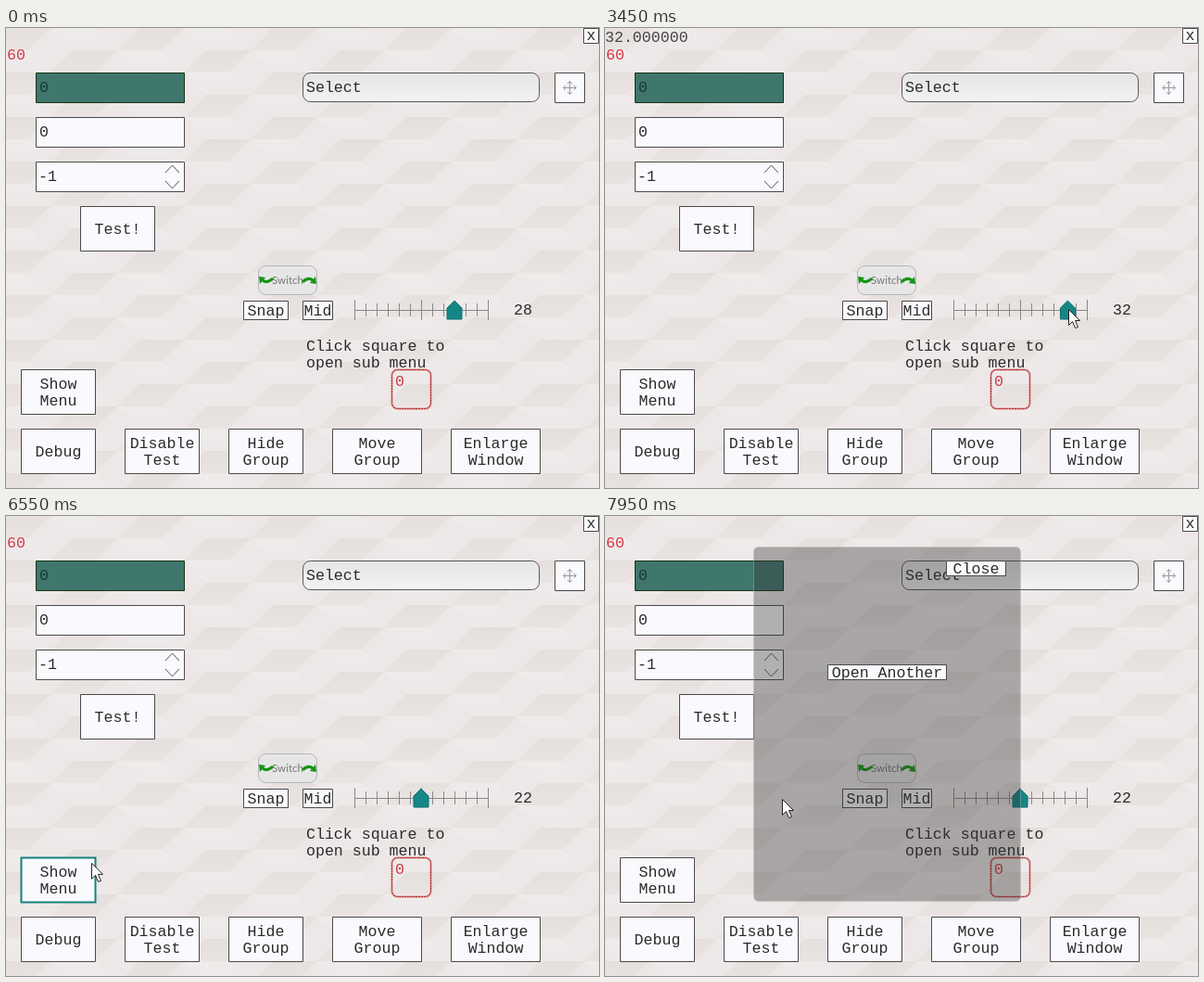
An HTML page with a canvas for the animation above (8000 ms loop, 640x496 px).

```html
<!DOCTYPE html>
<html>
<head>
<meta charset="utf-8">
<style>
html, body { margin: 0; width: 100%; height: 100%; overflow: hidden; background: #ece7e6; }
canvas { display: block; }
</style>
</head>
<body>
<canvas id="stage" width="640" height="496"></canvas>
<script>
const stage = document.getElementById('stage');
const ctx = stage.getContext('2d');
const LOOP = 8000;
const INK = '#2b2b2b', PAPER = '#fafafe', TEAL = '#16817f', RED = '#d33a48';
const MONO = '16.6px "Liberation Mono", "Courier New", monospace';

// Pointer path: time, x, y
const POINTER = [
  [50, 492, 448], [550, 484, 304], [900, 484, 306], [1250, 483, 384], [1650, 484, 304],
  [1750, 482, 304], [2050, 453, 304], [2150, 449, 304], [2600, 390, 304],
  [3405, 504, 303], [3450, 500, 303], [4195, 406, 304], [4300, 385, 304],
  [4420, 382, 304], [4780, 448, 304], [4850, 448, 304], [5150, 279, 303],
  [5500, 277, 303], [6050, 277, 303], [6650, 55, 388], [7600, 55, 388],
  [7700, 68, 384], [7950, 191, 305], [8000, 191, 305]
];
const GRAB = 600, RELEASE = 4850, MENU_START = 6890;

const clamp = v => Math.max(0, Math.min(1, v));

function pointerAt(t) {
  if (t <= POINTER[0][0]) return POINTER[0].slice(1);
  const i = POINTER.findIndex(k => k[0] >= t);
  const [t0, x0, y0] = POINTER[i - 1], [t1, x1, y1] = POINTER[i];
  const p = (t - t0) / (t1 - t0);
  return [x0 + (x1 - x0) * p, y0 + (y1 - y0) * p];
}

// The value snaps to even steps and trails the pointer slightly.
function valueAt(t) {
  if (t < GRAB) return 28;
  const x = pointerAt(Math.min(t, RELEASE) - 50)[0];
  return 10 + 2 * Math.max(0, Math.min(12, Math.round((x - 376) / 12)));
}

// Exponential smoothing of the snapped position.
function handleAt(t) {
  let sum = 0, total = 0;
  for (let age = 0; age < 210; age += 3) {
    const weight = Math.exp(-age / 30);
    sum += weight * (376 + (valueAt(t - age) - 10) * 6);
    total += weight;
  }
  return sum / total;
}

function text(str, x, y, color = INK, align = 'left', font = MONO) {
  ctx.font = font;
  ctx.textAlign = align;
  ctx.textBaseline = 'middle';
  ctx.fillStyle = color;
  ctx.fillText(str, x, y + 1);
}

function box(x, y, w, h, fill = PAPER, stroke = '#4a4a4a', radius = 0, line = 1) {
  ctx.beginPath();
  ctx.roundRect(x + .5, y + .5, w - 1, h - 1, radius);
  if (fill) { ctx.fillStyle = fill; ctx.fill(); }
  if (stroke) { ctx.strokeStyle = stroke; ctx.lineWidth = line; ctx.stroke(); }
}

function button(x, y, w, h, label, stroke, line) {
  box(x, y, w, h, PAPER, stroke, 0, line);
  const rows = label.split('\n');
  rows.forEach((row, i) =>
    text(row, x + w / 2, y + h / 2 + (i - (rows.length - 1) / 2) * 18, INK, 'center'));
}

function shape(points, fill, stroke) {
  ctx.beginPath();
  points.forEach(([x, y]) => ctx.lineTo(x, y));
  ctx.closePath();
  if (fill) { ctx.fillStyle = fill; ctx.fill(); }
  if (stroke) { ctx.strokeStyle = stroke; ctx.lineWidth = 1; ctx.stroke(); }
}

function lines(color, segments, width = 1) {
  ctx.strokeStyle = color;
  ctx.lineWidth = width;
  ctx.beginPath();
  for (const [first, ...rest] of segments) {
    ctx.moveTo(...first);
    rest.forEach(p => ctx.lineTo(...p));
  }
  ctx.stroke();
}

function linear(x0, y0, x1, y1, from, to) {
  const g = ctx.createLinearGradient(x0, y0, x1, y1);
  g.addColorStop(0, from);
  g.addColorStop(1, to);
  return g;
}

function background() {
  const s = 48, h = 24;
  ctx.fillStyle = '#ede8e7';
  ctx.fillRect(0, 0, 640, 496);
  for (let col = 0; col < 11; col++) {
    for (let row = -1; row < 12; row++) {
      const x = col * s * 1.5, y = row * h * 2 + (col % 2) * h;
      shape([[x, y], [x + s, y], [x + s / 2, y + h], [x - s / 2, y + h]],
        linear(x, y, x, y + h, '#e5dfde', '#e9e3e2'));
      shape([[x, y], [x + s, y], [x + s / 2, y - h], [x - s / 2, y - h]],
        linear(x, y - h, x, y, '#efebea', '#ede9e8'));
    }
  }
}

function switchArrow(x, flip) {
  ctx.save();
  ctx.translate(x, 272);
  ctx.scale(flip, flip);
  ctx.strokeStyle = '#149414';
  ctx.lineWidth = 3;
  ctx.beginPath();
  ctx.moveTo(7, -2);
  ctx.quadraticCurveTo(1, 4, -4, 0);
  ctx.stroke();
  shape([[-8, -4], [-1, -3], [-7, 4]], '#149414');
  ctx.restore();
}

function fields() {
  box(32, 48, 161, 33, '#40776d', '#15330f');
  text('0', 36, 64, '#183832');
  box(32, 96, 161, 33);
  text('0', 36, 112);
  box(32, 144, 161, 33);
  text('-1', 35, 160);
  lines('#555', [
    [[172, 156], [179.5, 148], [187, 156]],
    [[172, 165], [179.5, 173], [187, 165]]
  ]);

  box(320, 48, 256, 32, linear(0, 48, 0, 80, '#e4e4e4', '#f3f3f3'), '#555', 8);
  text('Select', 324, 64);
  box(592, 48, 33, 33);
  lines('#999', [
    [[602, 64.5], [615, 64.5]], [[608.5, 58], [608.5, 71]],
    [[604, 62], [601.5, 64.5], [604, 67]], [[613, 62], [615.5, 64.5], [613, 67]],
    [[606, 60], [608.5, 57.5], [611, 60]], [[606, 69], [608.5, 71.5], [611, 69]]
  ]);
  box(623, 0, 17, 17);
  text('x', 631.5, 8, INK, 'center');
}

function slider(t) {
  const ticks = [[[376, 304.5], [521, 304.5]]];
  for (let i = 0; i <= 12; i++) {
    const x = 376.5 + i * 12, reach = i % 6 ? 7 : 11;
    ticks.push([[x, 304 - reach], [x, 304 + reach]]);
  }
  lines('#8b8888', ticks);
  const x = handleAt(t);
  shape([[x, 294], [x + 8, 302], [x + 8, 314], [x - 8, 314], [x - 8, 302]], '#158686', '#0d6e70');
  text(valueAt(t), 548, 304);
}

function controls(t, px, py) {
  const hover = (x, y, w, h) => t >= 50 && px >= x && px < x + w && py >= y && py < y + h;
  const plain = '#4a4a4a';

  button(80, 192, 81, 49, 'Test!');
  box(272, 256, 64, 32, '#e6e6e6', '#b4b4b4', 8);
  text('Switch', 304, 271, '#777', 'center', '11.5px Lato, "Open Sans", sans-serif');
  switchArrow(281, 1);
  switchArrow(327, -1);

  const snap = hover(256, 294, 49, 21), mid = t > RELEASE && hover(320, 294, 33, 21);
  button(256, 294, 49, 21, 'Snap', snap ? TEAL : plain, snap ? 2 : 1);
  button(320, 294, 33, 21, 'Mid', mid ? TEAL : plain, mid ? 2 : 1);
  slider(t);

  text('Click square to', 324, 343);
  text('open sub menu', 324, 361);
  box(416, 368, 43, 43, null, '#d98a8a', 6, 2);
  ctx.setLineDash([2, 1]);
  box(416, 368, 43, 43, null, '#b02a2a', 6);
  ctx.setLineDash([]);
  text('0', 420, 381, RED);

  const pressed = t >= MENU_START - 40 && t < 7550;
  const over = t < MENU_START && hover(16, 368, 81, 49);
  button(16, 368, 81, 49, 'Show\nMenu', pressed ? '#a33c3c' : over ? TEAL : plain, pressed || over ? 2 : 1);
  button(16, 432, 81, 49, 'Debug');
  button(128, 432, 81, 49, 'Disable\nTest');
  button(240, 432, 81, 49, 'Hide\nGroup');
  button(352, 432, 97, 49, 'Move\nGroup');
  button(480, 432, 97, 49, 'Enlarge\nWindow');
}

function menu(t) {
  const age = t - MENU_START;
  if (age < 0) return;
  const p = clamp(age / 800) - 1;
  const eased = 1 + 2.70158 * p ** 3 + 1.70158 * p ** 2;
  ctx.save();
  ctx.translate(0, 52 * (1 - eased));
  ctx.globalAlpha = clamp(age / 90);
  box(160, 33, 289, 383, 'rgba(50,50,50,.37)', 'rgba(190,190,190,.4)', 5);
  ctx.globalAlpha = clamp(age / 520);
  button(368, 48, 65, 17, 'Close');
  button(240, 160, 129, 17, 'Open Another');
  ctx.restore();
}

function pointer(x, y) {
  const outline = [[0, 0], [0, 17], [4, 13], [7, 20], [10, 19], [7, 12], [12, 12]];
  shape(outline.map(([dx, dy]) => [x + dx + .5, y + dy + .5]), '#fff', '#222');
}

function draw(t) {
  const [px, py] = pointerAt(t);
  background();
  if (t >= GRAB && t < RELEASE) text(valueAt(t).toFixed(6), 0, 10, '#444');
  text('60', 1, 29, RED);
  fields();
  controls(t, px, py);
  menu(t);
  if (t >= 50) pointer(px, py);
}

const start = performance.now();
function frame() {
  const t = (performance.now() - start) % LOOP;
  draw(Math.floor(t / 50) * 50);
  requestAnimationFrame(frame);
}
frame();
</script>
</body>
</html>
```
